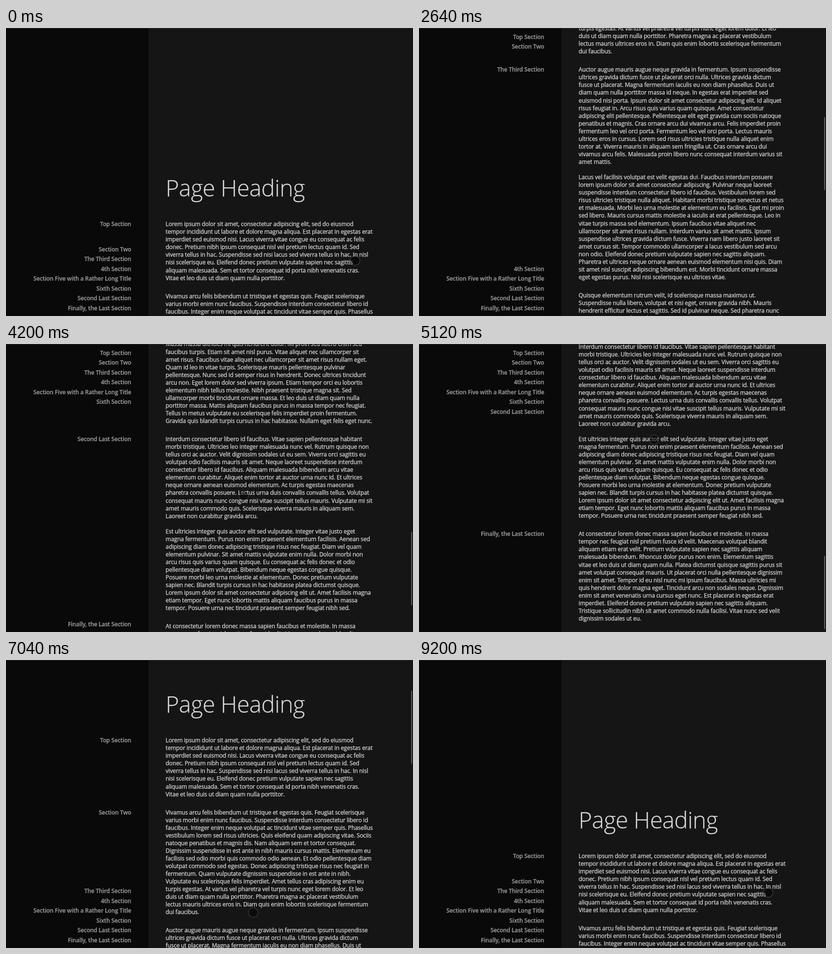
Write an HTML page that moves like this. It is 851x602 px and loops after 9.24 s.

```html
<!DOCTYPE html>
<html lang="en">
<head>
<meta charset="utf-8">
<title>Page Heading</title>
<style>
  html, body { margin: 0; width: 100%; height: 100%; overflow: hidden; background: #151515; }
  body { position: relative; font: 12px/16.0625px "Open Sans", sans-serif; letter-spacing: -.12px;
    color: #e0e0e0; -webkit-text-stroke: .25px; }
  #side { position: absolute; left: 0; top: 0; width: 35%; height: 100%; background: #090909; }
  #side div { position: absolute; top: 0; right: 36px; font-weight: 600; color: #979797; white-space: pre; }
  #page { position: absolute; top: 0; left: calc(35% + 36px); padding-top: 402.18px; white-space: pre; }
  h1 { position: absolute; left: 0; top: 301px; margin: 0; font-size: 48px; font-weight: 300; line-height: 65px;
    letter-spacing: -.01em; color: #d9d9d9; }
  section { margin-bottom: 21.875px; }
  p { margin: 0; }
  p + p { margin-top: 16.02px; }
  #edge { position: absolute; left: 0; right: 0; top: 0; height: 1px; background: #292929; }
  #thumb { position: absolute; left: 847px; top: 0; width: 2px; height: 153px; border-radius: 1px; background: #626262; }
  #cursor { position: absolute; left: -11px; top: -11px; width: 22px; height: 22px; box-sizing: border-box;
    border: 2px solid rgba(255,255,255,.1); border-radius: 50%; background: rgba(0,0,0,.5); background-clip: padding-box; }
</style>
</head>
<body>
<div id="page"><h1>Page Heading</h1></div>
<div id="side"></div>
<div id="edge"></div>
<div id="thumb"></div>
<div id="cursor"></div>
<script>
// "# " opens a section, a blank line starts a new paragraph.
const TEXT = `# Top Section
Lorem ipsum dolor sit amet, consectetur adipiscing elit, sed do eiusmod
tempor incididunt ut labore et dolore magna aliqua. Est placerat in egestas erat
imperdiet sed euismod nisi. Lacus viverra vitae congue eu consequat ac felis
donec. Pretium nibh ipsum consequat nisl vel pretium lectus quam id. Sed
viverra tellus in hac. Suspendisse sed nisi lacus sed viverra tellus in hac. In nisl
nisi scelerisque eu. Eleifend donec pretium vulputate sapien nec sagittis
aliquam malesuada. Sem et tortor consequat id porta nibh venenatis cras.
Vitae et leo duis ut diam quam nulla porttitor.
# Section Two
Vivamus arcu felis bibendum ut tristique et egestas quis. Feugiat scelerisque
varius morbi enim nunc faucibus. Suspendisse interdum consectetur libero id
faucibus. Integer enim neque volutpat ac tincidunt vitae semper quis. Phasellus
vestibulum lorem sed risus ultricies. Quis eleifend quam adipiscing vitae. Sociis
natoque penatibus et magnis dis. Nam aliquam sem et tortor consequat.
Dignissim suspendisse in est ante in nibh mauris cursus mattis. Elementum eu
facilisis sed odio morbi quis commodo odio aenean. Et odio pellentesque diam
volutpat commodo sed egestas. Donec adipiscing tristique risus nec feugiat in
fermentum. Quam vulputate dignissim suspendisse in est ante in nibh.
Vulputate eu scelerisque felis imperdiet. Amet tellus cras adipiscing enim eu
turpis egestas. At varius vel pharetra vel turpis nunc eget lorem dolor. Et leo
duis ut diam quam nulla porttitor. Pharetra magna ac placerat vestibulum
lectus mauris ultrices eros in. Diam quis enim lobortis scelerisque fermentum
dui faucibus.
# The Third Section
Auctor augue mauris augue neque gravida in fermentum. Ipsum suspendisse
ultrices gravida dictum fusce ut placerat orci nulla. Ultrices gravida dictum
fusce ut placerat. Magna fermentum iaculis eu non diam phasellus. Duis ut
diam quam nulla porttitor massa id neque. In egestas erat imperdiet sed
euismod nisi porta. Ipsum dolor sit amet consectetur adipiscing elit. Id aliquet
risus feugiat in. Arcu risus quis varius quam quisque. Amet consectetur
adipiscing elit pellentesque. Pellentesque elit eget gravida cum sociis natoque
penatibus et magnis. Cras ornare arcu dui vivamus arcu. Felis imperdiet proin
fermentum leo vel orci porta. Fermentum leo vel orci porta. Lectus mauris
ultrices eros in cursus. Lorem sed risus ultricies tristique nulla aliquet enim
tortor at. Viverra mauris in aliquam sem fringilla ut. Cras ornare arcu dui
vivamus arcu felis. Malesuada proin libero nunc consequat interdum varius sit
amet mattis.

Lacus vel facilisis volutpat est velit egestas dui. Faucibus interdum posuere
lorem ipsum dolor sit amet consectetur adipiscing. Pulvinar neque laoreet
suspendisse interdum consectetur libero id faucibus. Vestibulum lorem sed
risus ultricies tristique nulla aliquet. Habitant morbi tristique senectus et netus
et malesuada. Morbi leo urna molestie at elementum eu facilisis. Eget mi proin
sed libero. Mauris cursus mattis molestie a iaculis at erat pellentesque. Leo in
vitae turpis massa sed elementum. Ipsum faucibus vitae aliquet nec
ullamcorper sit amet risus nullam. Interdum varius sit amet mattis. Ipsum
suspendisse ultrices gravida dictum fusce. Viverra nam libero justo laoreet sit
amet cursus sit. Tempor commodo ullamcorper a lacus vestibulum sed arcu
non odio. Eleifend donec pretium vulputate sapien nec sagittis aliquam.
Pharetra et ultrices neque ornare aenean euismod elementum nisi quis. Diam
sit amet nisl suscipit adipiscing bibendum est. Morbi tincidunt ornare massa
eget egestas purus. Nisl nisi scelerisque eu ultrices vitae.
# 4th Section
Quisque elementum rutrum velit, id scelerisque massa maximus ut.
Suspendisse nulla libero, volutpat et nisi eget, ornare gravida nibh. Mauris
hendrerit efficitur lectus et sagittis. Sed id pulvinar neque. Sed pharetra nunc
ac augue cursus malesuada. Vivamus mattis magna velit, sit amet pharetra elit
ullamcorper nec. Orci varius natoque penatibus et magnis dis parturient
montes, nascetur ridiculus mus.
# Section Five with a Rather Long Title
Iaculis at erat pellentesque adipiscing commodo elit at imperdiet. In nibh
mauris cursus mattis molestie a iaculis at. Eleifend mi in nulla posuere
sollicitudin aliquam ultrices. Sem fringilla ut morbi tincidunt. Rutrum tellus
pellentesque eu tincidunt tortor aliquam. Quis lectus nulla at volutpat diam.
Nunc eget lorem dolor sed. Diam quam nulla porttitor massa id neque aliquam
vestibulum morbi. Tincidunt dui ut ornare lectus sit. Lacus luctus accumsan
tortor posuere ac ut consequat semper viverra.
# Sixth Section
Massa massa ultricies mi quis hendrerit dolor. Mi proin sed libero enim sed
faucibus turpis. Etiam sit amet nisl purus. Vitae aliquet nec ullamcorper sit
amet risus. Faucibus vitae aliquet nec ullamcorper sit amet risus nullam eget.
Quam id leo in vitae turpis. Scelerisque mauris pellentesque pulvinar
pellentesque. Nunc sed id semper risus in hendrerit. Donec ultrices tincidunt
arcu non. Eget lorem dolor sed viverra ipsum. Etiam tempor orci eu lobortis
elementum nibh tellus molestie. Nibh praesent tristique magna sit. Sed
ullamcorper morbi tincidunt ornare massa. Et leo duis ut diam quam nulla
porttitor massa. Mattis aliquam faucibus purus in massa tempor nec feugiat.
Tellus in metus vulputate eu scelerisque felis imperdiet proin fermentum.
Gravida quis blandit turpis cursus in hac habitasse. Nullam eget felis eget nunc.
# Second Last Section
Interdum consectetur libero id faucibus. Vitae sapien pellentesque habitant
morbi tristique. Ultricies leo integer malesuada nunc vel. Rutrum quisque non
tellus orci ac auctor. Velit dignissim sodales ut eu sem. Viverra orci sagittis eu
volutpat odio facilisis mauris sit amet. Neque laoreet suspendisse interdum
consectetur libero id faucibus. Aliquam malesuada bibendum arcu vitae
elementum curabitur. Aliquet enim tortor at auctor urna nunc id. Et ultrices
neque ornare aenean euismod elementum. Ac turpis egestas maecenas
pharetra convallis posuere. Lectus urna duis convallis convallis tellus. Volutpat
consequat mauris nunc congue nisi vitae suscipit tellus mauris. Vulputate mi sit
amet mauris commodo quis. Scelerisque viverra mauris in aliquam sem.
Laoreet non curabitur gravida arcu.

Est ultricies integer quis auctor elit sed vulputate. Integer vitae justo eget
magna fermentum. Purus non enim praesent elementum facilisis. Aenean sed
adipiscing diam donec adipiscing tristique risus nec feugiat. Diam vel quam
elementum pulvinar. Sit amet mattis vulputate enim nulla. Dolor morbi non
arcu risus quis varius quam quisque. Eu consequat ac felis donec et odio
pellentesque diam volutpat. Bibendum neque egestas congue quisque.
Posuere morbi leo urna molestie at elementum. Donec pretium vulputate
sapien nec. Blandit turpis cursus in hac habitasse platea dictumst quisque.
Lorem ipsum dolor sit amet consectetur adipiscing elit ut. Amet facilisis magna
etiam tempor. Eget nunc lobortis mattis aliquam faucibus purus in massa
tempor. Posuere urna nec tincidunt praesent semper feugiat nibh sed.
# Finally, the Last Section
At consectetur lorem donec massa sapien faucibus et molestie. In massa
tempor nec feugiat nisl pretium fusce id velit. Maecenas volutpat blandit
aliquam etiam erat velit. Pretium vulputate sapien nec sagittis aliquam
malesuada bibendum. Rhoncus dolor purus non enim. Elementum sagittis
vitae et leo duis ut diam quam nulla. Platea dictumst quisque sagittis purus sit
amet volutpat consequat mauris. Ut placerat orci nulla pellentesque dignissim
enim sit amet. Tempor id eu nisl nunc mi ipsum faucibus. Massa ultricies mi
quis hendrerit dolor magna eget. Tincidunt arcu non sodales neque. Dignissim
enim sit amet venenatis urna cursus eget nunc. Est placerat in egestas erat
imperdiet. Eleifend donec pretium vulputate sapien nec sagittis aliquam.
Tristique sollicitudin nibh sit amet commodo nulla facilisi. Vitae nunc sed velit
dignissim sodales ut eu.`;

const LOOP = 9240, STEP = 40, PITCH = 20.5, TOP = 10.9, BOTTOM = 577.9;

// [time, scroll offset]
const SCROLL = [[0, 0], [160, 0], [1440, 307], [2640, 720], [3520, 1208], [4000, 1452], [4920, 1724],
  [5280, 1724], [6200, 860], [7040, 242], [7640, 18], [7800, 18], [8200, 0], [LOOP, 0]];
// [time, x, y]
const POINTER = [[0, 730, 486], [160, 730, 486], [1440, 648, 400], [2640, 581, 321], [3520, 511, 416],
  [4960, 491, 200], [5280, 491, 200], [7040, 517, 528], [7640, 522, 548], [7800, 522, 548],
  [8720, 638, 297], [9160, 731, 485], [9200, 730, 486], [LOOP, 730, 486]];
const POINTER_FADE = [[0, 1], [160, 1], [600, .5], [2640, .35], [3520, .6], [4900, 1], [LOOP, 1]];
const THUMB_FADE = [[0, 0], [160, 0], [320, 1], [8280, 1], [8640, 0], [LOOP, 0]];

// Smooth interpolation that never overshoots its keys.
function at(keys, t, col = 1) {
  let i = 0;
  while (i < keys.length - 2 && t >= keys[i + 1][0]) i++;
  const slope = k => k < 0 || k > keys.length - 2 ? 0
    : (keys[k + 1][col] - keys[k][col]) / (keys[k + 1][0] - keys[k][0]);
  const tangent = k => {
    const a = slope(k - 1), b = slope(k);
    return a * b > 0 ? 2 * a * b / (a + b) : 0;
  };
  const h = keys[i + 1][0] - keys[i][0], u = (t - keys[i][0]) / h, v = 1 - u;
  return keys[i][col] * (1 + 2 * u) * v * v + keys[i + 1][col] * u * u * (3 - 2 * u)
    + h * u * v * (tangent(i) * v - tangent(i + 1) * u);
}

const $ = id => document.getElementById(id);
const add = (parent, tag, text = "") => {
  const el = parent.appendChild(document.createElement(tag));
  el.textContent = text;
  return el;
};
const page = $("page"), side = $("side"), thumb = $("thumb"), cursor = $("cursor");

const items = TEXT.slice(2).split("\n# ").map(part => {
  const cut = part.indexOf("\n");
  const section = add(page, "section");
  part.slice(cut + 1).split("\n\n").forEach(text => add(section, "p", text));
  return { label: add(side, "div", part.slice(0, cut)), section };
});
for (const item of items) item.y = item.section.getBoundingClientRect().top;

const move = (el, x, y) => { el.style.transform = `translate(${x}px, ${y}px)`; };

function draw(time) {
  const t = Math.floor(time % LOOP / STEP) * STEP;
  const scroll = Math.round(at(SCROLL, t));
  move(page, 0, -scroll);
  items.forEach(({ label, y }, i) => {
    const low = BOTTOM - PITCH * (items.length - 1 - i);
    move(label, 0, Math.round(Math.max(TOP + PITCH * i, Math.min(y - scroll, low))));
  });
  move(thumb, 0, Math.round(2.5 + scroll * .2553));
  thumb.style.opacity = at(THUMB_FADE, t);
  move(cursor, Math.round(at(POINTER, t)), Math.round(at(POINTER, t, 2)));
  cursor.style.opacity = at(POINTER_FADE, t);
}

const start = performance.now();
function tick() {
  draw(performance.now() - start);
  requestAnimationFrame(tick);
}
tick();
</script>
</body>
</html>
```
